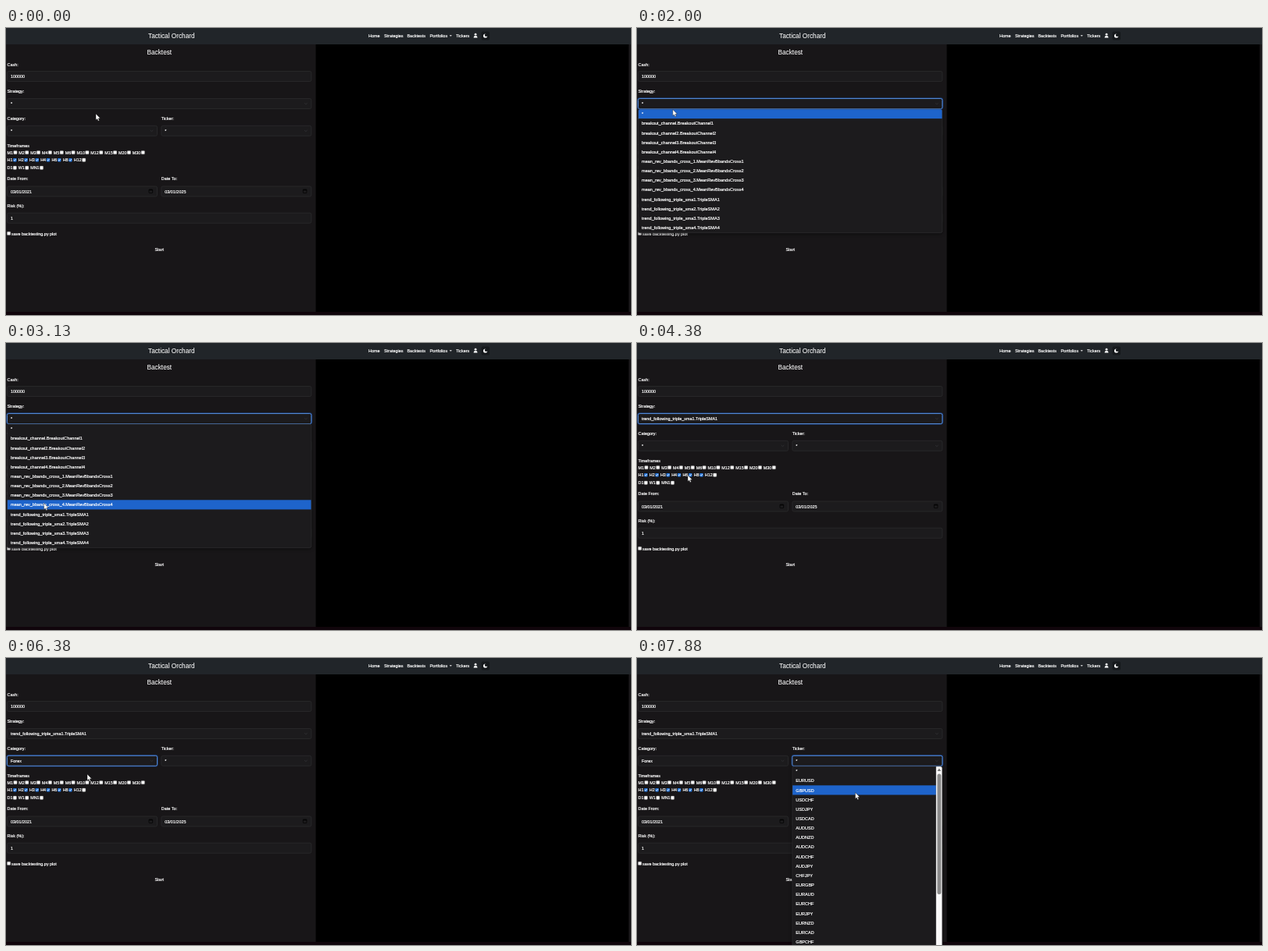
These frames come from a looping animation (800 px wide and 368 px high, 8 s). An HTML page with a canvas:

```html
<!DOCTYPE html>
<html lang="en">
<head>
<meta charset="utf-8">
<title>Backtest form</title>
<style>
  html, body { margin: 0; width: 100%; height: 100%; overflow: hidden; background: #000; }
  canvas { display: block; width: 800px; height: 368px; }
</style>
</head>
<body>
<canvas id="stage" width="800" height="368"></canvas>
<script>
const ctx = document.getElementById('stage').getContext('2d');
const LOOP = 8000, TICK = 125, ROW = 12.16;
const BODY = 5.42, OPTION = 5.57, TITLE = 8.25;
const PANEL = '#181618', FIELD = '#1c1b1d', BLUE = '#1e64cb';

const four = make => [1, 2, 3, 4].map(make);
const strategies = ['*',
  ...four(n => `breakout_channel${n > 1 ? n : ''}.BreakoutChannel${n}`),
  ...four(n => `mean_rev_bbands_cross_${n}.MeanRevBbandsCross${n}`),
  ...four(n => `trend_following_triple_sma${n}.TripleSMA${n}`)];
const categories = ['*', 'Forex'];
const tickers = ('* EURUSD GBPUSD USDCHF USDJPY USDCAD AUDUSD AUDNZD AUDCAD AUDCHF ' +
  'AUDJPY CHFJPY EURGBP EURAUD EURCHF EURJPY EURNZD EURCAD GBPCHF').split(' ');

// Pointer path: time, x, y
const path = [
  [0, 115, 110], [250, 110, 108], [875, 110, 108], [1500, 46, 97],
  [1875, 46, 100], [2000, 45.8, 104.5], [2500, 46.3, 187.5], [2625, 47, 196],
  [3125, 48.6, 205.5], [3500, 49.5, 214.5], [3625, 51, 216], [3750, 51, 216],
  [4375, 65, 169.5], [4625, 82, 140], [5000, 104, 131], [5500, 104, 155],
  [5875, 104, 155], [6375, 104, 149], [6750, 278, 132], [7375, 278, 132],
  [7875, 279.4, 172.5], [8000, 279.4, 172.5]
];

function pointerAt(t) {
  const i = Math.max(1, path.findIndex(k => k[0] >= t));
  const [t0, x0, y0] = path[i - 1], [t1, x1, y1] = path[i];
  const f = (t - t0) / (t1 - t0);
  return [x0 + (x1 - x0) * f, y0 + (y1 - y0) * f];
}

function setFont(size) {
  ctx.font = `${size * 10}px "Liberation Sans", Arial, sans-serif`;
}

function textWidth(str, size) {
  setFont(size);
  return ctx.measureText(str).width / 10;
}

// Set at ten times the size, then scaled down, to keep fractional advances
function text(str, x, mid, size = BODY, weight = 0.2) {
  ctx.save();
  ctx.translate(x, mid + size * 0.36);
  ctx.scale(0.1, 0.1);
  setFont(size);
  ctx.fillStyle = ctx.strokeStyle = '#fff';
  ctx.lineWidth = weight * 10;
  ctx.lineJoin = 'round';
  ctx.fillText(str, 0, 0);
  if (weight) ctx.strokeText(str, 0, 0);
  ctx.restore();
}

function rect(x, y, w, h, color) {
  ctx.fillStyle = color;
  ctx.fillRect(x, y, w, h);
}

function round(x, y, w, h, r, fill, stroke, line = 1) {
  ctx.beginPath();
  ctx.roundRect(x, y, w, h, r);
  if (fill) { ctx.fillStyle = fill; ctx.fill(); }
  if (stroke) { ctx.strokeStyle = stroke; ctx.lineWidth = line; ctx.stroke(); }
}

function poly(points, fill) {
  ctx.beginPath();
  points.forEach(([x, y]) => ctx.lineTo(x, y));
  ctx.closePath();
  ctx.fillStyle = fill;
  ctx.fill();
}

function line(points, color, width) {
  ctx.beginPath();
  points.forEach(([x, y]) => ctx.lineTo(x, y));
  ctx.strokeStyle = color;
  ctx.lineWidth = width;
  ctx.stroke();
}

function disc(x, y, r, color) {
  ctx.beginPath();
  ctx.arc(x, y, r, 0, Math.PI * 2);
  ctx.fillStyle = color;
  ctx.fill();
}

function field(x, y, w, value, focus) {
  if (focus) round(x - 0.2, y - 0.2, w + 0.4, 13.4, 2.4, null, 'rgba(30,90,190,.55)', 2);
  round(x, y, w, 13, 2, FIELD, focus ? '#5a92e0' : '#2b2b2d', focus ? 0.9 : 0.8);
  text(value, x + 4.5, y + 6.6);
}

function select(x, y, w, value, focus) {
  field(x, y, w, value, focus);
  const cx = x + w - 7, cy = y + 6.5;
  line([[cx - 1.8, cy - 0.8], [cx, cy + 0.9], [cx + 1.8, cy - 0.8]], '#343437', 0.8);
}

function dateField(x, w, value) {
  field(x, 203, w, value);
  const ix = x + w - 10.5;
  round(ix, 207, 4.6, 4.6, 0.6, null, '#050505', 0.8);
  rect(ix, 207, 4.6, 1.4, '#050505');
}

function checkbox(cx, cy, on) {
  round(cx - 2.2, cy - 2.2, 4.4, 4.4, 0.8, on ? '#2878dc' : '#f4f4f4', on ? null : '#8a8a8a', 0.4);
  if (on) line([[cx - 1.3, cy], [cx - 0.3, cy + 1.1], [cx + 1.4, cy - 1.2]], '#fff', 0.8);
}

function checkRow(labels, y, checked = 0) {
  let x = 1.5;
  labels.split(' ').forEach((label, i) => {
    text(label, x, y);
    x += textWidth(label, BODY);
    checkbox(x + 2.9, y - 0.2, i < checked);
    x += 7.3;
  });
}

function menu(x, y, w, items, pointerY, scroll) {
  const h = items.length * ROW + 0.6;
  const hover = Math.min(items.length - 1, Math.max(0, Math.floor((pointerY - y) / ROW)));
  const listW = scroll ? w - 8 : w;
  ctx.save();
  ctx.shadowColor = 'rgba(0,0,0,.6)';
  ctx.shadowBlur = 4;
  ctx.shadowOffsetY = 1;
  round(x, y, w, h, 2.5, FIELD);
  ctx.restore();
  ctx.save();
  ctx.beginPath();
  ctx.roundRect(x, y, w, h, 2.5);
  ctx.clip();
  rect(x, y + hover * ROW, listW, ROW, BLUE);
  items.forEach((item, i) => text(item, x + 4.5, y + 6.2 + i * ROW, OPTION));
  if (scroll) {
    rect(x + listW, y, 8, h, '#fafafa');
    poly([[x + w - 6.4, y + 6], [x + w - 4, y + 2.6], [x + w - 1.6, y + 6]], '#777');
    round(x + w - 6.5, y + 9.5, 5, 154.5, 2.5, '#8b8b8b');
  }
  ctx.restore();
  round(x, y, w, h, 2.5, null, '#39393b', 0.5);
}

function navbar() {
  rect(0, 0, 800, 21, '#212529');
  text('Tactical Orchard', 182, 10.4, TITLE, 0.05);
  [['Home', 464], ['Strategies', 484], ['Backtests', 513.5], ['Portfolios', 542.5], ['Tickers', 576]]
    .forEach(([label, x]) => text(label, x, 9.9));
  poly([[567.6, 9.2], [570.8, 9.2], [569.2, 10.8]], '#fff');
  disc(601, 8.2, 1.4, '#fff');
  round(598.6, 10, 4.8, 2.6, [2, 2, 0.4, 0.4], '#fff');
  round(608.5, 4.5, 10.5, 11, 2, '#16191c');
  disc(613.5, 10, 2.6, '#fff');
  disc(614.8, 9, 2.1, '#16191c');
}

function form(t) {
  const focus = t >= 6750 ? 'ticker' : t >= 5000 ? 'category' : t >= 1500 ? 'strategy' : '';
  text('Backtest', 180.5, 30.6, TITLE, 0.05);
  text('Cash:', 1.5, 46.6);
  field(1.5, 55.5, 389.3, '100000');
  text('Strategy:', 1.5, 81.2);
  select(1.5, 90.5, 389.3, t >= 3875 ? strategies[9] : '*', focus === 'strategy');
  text('Category:', 1.5, 116);
  select(1.5, 125.3, 192, t >= 6000 ? 'Forex' : '*', focus === 'category');
  text('Ticker:', 198.8, 116);
  select(198.8, 125.3, 192, '*', focus === 'ticker');

  text('Timeframes', 1.5, 150.8);
  checkRow('M1 M2 M3 M4 M5 M6 M10 M12 M15 M20 M30', 159.8);
  checkRow('H1 H2 H3 H4 H6 H8 H12', 169.4, 6);
  checkRow('D1 W1 MN1', 179.4);

  text('Date From:', 1.5, 193.2);
  dateField(1.5, 192, '03/01/2021');
  text('Date To:', 198.8, 193.2);
  dateField(198.8, 192, '03/01/2025');
  text('Risk (%):', 1.5, 228);
  field(1.5, 237.2, 389.3, '1');
  checkbox(3.6, 263.4, false);
  text('save backtesting.py plot', 7, 263.6);
  text('Start', 190.5, 283.7);
}

function pointer(x, y) {
  const shape = [[0, 0], [0, 8], [1.8, 6.4], [3, 9.2], [4.4, 8.6], [3.2, 5.9], [5.6, 5.7]];
  ctx.save();
  ctx.translate(x, y);
  poly(shape, '#fff');
  ctx.strokeStyle = '#111';
  ctx.lineWidth = 0.4;
  ctx.stroke();
  ctx.restore();
}

function draw(now) {
  const t = Math.floor((now % LOOP) / TICK) * TICK;
  const [px, py] = pointerAt(t);
  rect(0, 0, 800, 368, PANEL);
  rect(396.5, 21, 400.5, 347, '#000');
  rect(0, 364, 800, 4, '#10050b');
  navbar();
  form(t);
  if (t >= 1500 && t < 3875) menu(1.5, 104, 389.3, strategies, py);
  if (t >= 5000 && t < 6000) menu(1.5, 139, 192, categories, py);
  if (t >= 6750) menu(198.8, 139, 192, tickers, py, true);
  pointer(px, py);
}

function frame(now) {
  draw(now);
  requestAnimationFrame(frame);
}
draw(0);
requestAnimationFrame(frame);
</script>
</body>
</html>
```
